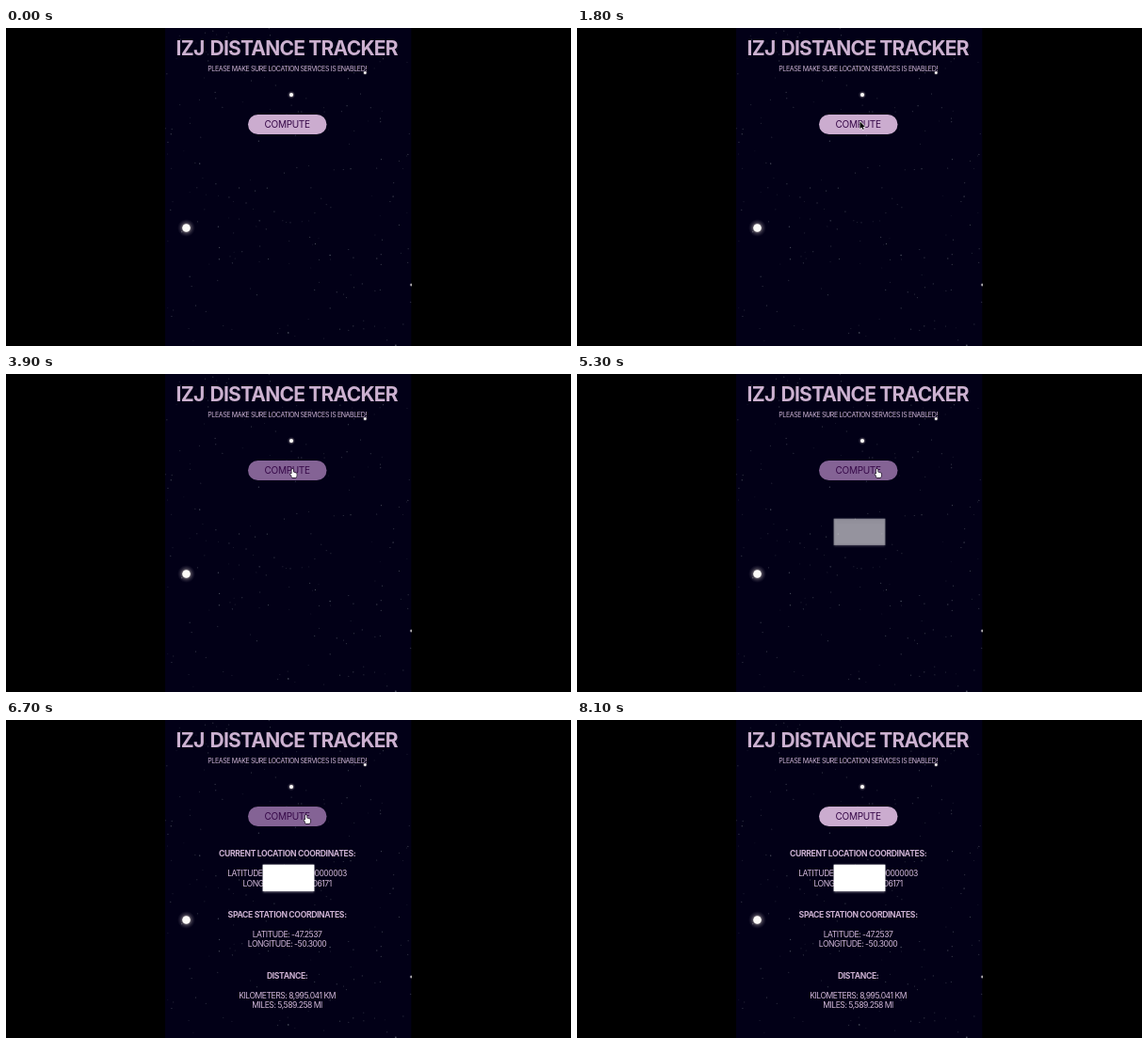
Write an HTML page with a canvas that moves like this. It is 600 px wide and 338 px high and loops after 8200 ms.

```html
<!DOCTYPE html>
<html lang="en">
<head>
<meta charset="utf-8">
<title>Distance Tracker</title>
<style>
  html, body { margin: 0; width: 100%; height: 100%; overflow: hidden; background: #000; }
  canvas { display: block; width: 100vw; height: 100vh; }
</style>
</head>
<body>
<canvas id="stage"></canvas>
<script>
const W = 600, H = 338, LOOP = 8200, CENTER = 298.8;
const PANEL = { x: 169, w: 261.6 };
const PINK = '#ccb1d0', PALE = '#d3b9d8';
const LIGHT = [203, 172, 207], DARK = [132, 99, 149];

const canvas = document.getElementById('stage');
const ratio = window.devicePixelRatio || 1;
canvas.width = W * ratio;
canvas.height = H * ratio;
const ctx = canvas.getContext('2d');

const clamp = v => Math.max(0, Math.min(1, v));
const ramp = (t, from, to) => clamp((t - from) / (to - from));
const mix = (a, b, k) => a + (b - a) * k;

function glide(t, from, to) {
  const k = ramp(t, from, to);
  return k * k * (3 - 2 * k);
}

function seeded(seed) {
  return () => {
    seed = (seed * 1664525 + 1013904223) >>> 0;
    return seed / 4294967296;
  };
}

// Mostly faint stars, with a few brighter ones
const rand = seeded(71);
const dust = Array.from({ length: 210 }, () => ({
  x: PANEL.x + rand() * PANEL.w,
  y: rand() * H,
  r: mix(0.4, 0.7, rand()),
  a: 0.15 + 0.2 * rand() + 0.5 * rand() ** 16
}));

const brightStars = [
  { x: 191.5, y: 212.5, r: 4.3 },
  { x: 303, y: 71, r: 2 },
  { x: 381.3, y: 47.6, r: 1.3 },
  { x: 430.8, y: 273, r: 1.2 }
];

function dot(x, y, r, fill) {
  ctx.fillStyle = fill;
  ctx.beginPath();
  ctx.arc(x, y, r, 0, Math.PI * 2);
  ctx.fill();
}

function glowStar({ x, y, r }) {
  const halo = ctx.createRadialGradient(x, y, r * 0.8, x, y, r * 2.2);
  halo.addColorStop(0, 'rgba(215,205,200,0.6)');
  halo.addColorStop(0.5, 'rgba(150,140,150,0.25)');
  halo.addColorStop(1, 'rgba(100,90,120,0)');
  dot(x, y, r * 2.2, halo);
  dot(x, y, r, '#fbfaf8');
}

function drawSky() {
  ctx.fillStyle = '#000';
  ctx.fillRect(0, 0, W, H);
  ctx.save();
  ctx.beginPath();
  ctx.rect(PANEL.x, 0, PANEL.w, H);
  ctx.clip();
  ctx.fillStyle = '#020017';
  ctx.fillRect(PANEL.x, 0, PANEL.w, H);
  dust.forEach(s => dot(s.x, s.y, s.r, `rgba(185,195,200,${s.a})`));
  brightStars.forEach(glowStar);
  ctx.restore();
}

function text(str, y, size, { x = CENTER, weight = 400, track = -0.056, color = PALE, align = 0.5 } = {}) {
  ctx.font = `${weight} ${size}px Inter, sans-serif`;
  ctx.letterSpacing = `${track * size}px`;
  ctx.fillStyle = color;
  const width = ctx.measureText(str).width - track * size;
  ctx.fillText(str, x - width * align, y);
}

function drawTitle() {
  const style = { weight: 700, track: -0.037, color: PINK, align: 0 };
  text('IZJ', 28.9, 21, { ...style, x: 180.6 });
  text('DISTANCE TRACKER', 28.9, 21, { ...style, x: 216.6 });
  text('PLEASE MAKE SURE LOCATION SERVICES IS ENABLED!', 46.4, 7, { track: -0.053 });
}

function drawButton(t) {
  const hover = glide(t, 1850, 2300) - glide(t, 7450, 7900);
  const tint = LIGHT.map((c, i) => Math.round(mix(c, DARK[i], hover)));
  ctx.fillStyle = `rgb(${tint})`;
  ctx.beginPath();
  ctx.roundRect(257, 92, 83.5, 21, 10.5);
  ctx.fill();
  text('COMPUTE', 105.6, 10, { track: -0.03, color: '#360848' });
}

const blocks = [
  ['CURRENT LOCATION COORDINATES:', 'LATITUDE: 40.800000000000003', 'LONGITUDE: -80.0006171'],
  ['SPACE STATION COORDINATES:', 'LATITUDE: -47.2537', 'LONGITUDE: -50.3000'],
  ['DISTANCE:', 'KILOMETERS: 8,995.041 KM', 'MILES: 5,589.258 MI']
];

function drawResults(t) {
  if (t < 5900) return;
  blocks.forEach(([heading, ...lines], i) => {
    const top = 145.4 + i * 64.9;
    text(heading, top, 8.6, { weight: 700, track: -0.041, color: PINK });
    lines.forEach((line, j) => text(line, top + 20.8 + j * 10.3, 8.6));
  });
}

function drawCover(t) {
  const alpha = ramp(t, 5100, 5550);
  if (!alpha) return;
  ctx.save();
  ctx.globalAlpha = alpha;
  ctx.shadowColor = 'rgba(200,195,205,0.7)';
  ctx.shadowBlur = 2 * ratio;
  ctx.shadowOffsetY = 0.6 * ratio;
  ctx.fillStyle = '#fff';
  ctx.fillRect(272.6, 153.7, 54.8, 28.2);
  ctx.restore();
}

const arrow = new Path2D('M0 0 V7.6 L1.8 6 L3.2 8.6 L4.2 8 L3.1 5.5 H5.4 Z');

// Index finger, three knuckles, palm and thumb
const hand = new Path2D();
hand.roundRect(-0.7, -0.2, 1.5, 7, 0.7);
for (let i = 0; i < 3; i++) hand.roundRect(0.6 + i * 1.2, 3 + i * 0.5, 1.5, 4, 0.7);
hand.roundRect(-0.9, 4.8, 5.3, 4, 1.4);
hand.roundRect(-2.2, 4.6, 2.4, 1.7, 0.8);

// The pointer spirals in onto the button, then slides along it and off
function pointerAt(t) {
  const spin = ramp(t, 100, 1800);
  const reach = (1 - spin) ** 2;
  const angle = spin * Math.PI * 4;
  const slide = 2.5 * glide(t, 1800, 2300) + 15.6 * glide(t, 3850, 4150) + 25 * glide(t, 7250, 7600);
  return [
    300.5 + 100 * reach * Math.cos(angle) + slide,
    99.5 - 80 * reach * Math.sin(angle) + 1.8 * glide(t, 1800, 2300)
  ];
}

function drawPointer(t) {
  if (t < 100 || t >= 7600) return;
  const pressing = t >= 1900 && t < 7450;
  const shape = pressing ? hand : arrow;
  ctx.save();
  ctx.translate(...pointerAt(t));
  ctx.lineJoin = 'round';
  ctx.lineWidth = 1.2;
  ctx.strokeStyle = pressing ? '#120a18' : '#eee';
  ctx.stroke(shape);
  ctx.fillStyle = pressing ? '#fff' : '#000';
  ctx.fill(shape);
  ctx.restore();
}

function draw(now) {
  const t = Math.floor((now % LOOP) / 100) * 100;
  ctx.setTransform(ratio, 0, 0, ratio, 0, 0);
  drawSky();
  drawTitle();
  drawButton(t);
  drawResults(t);
  drawCover(t);
  drawPointer(t);
}

const start = performance.now();
function tick() {
  draw(performance.now() - start);
  requestAnimationFrame(tick);
}
tick();
</script>
</body>
</html>
```
